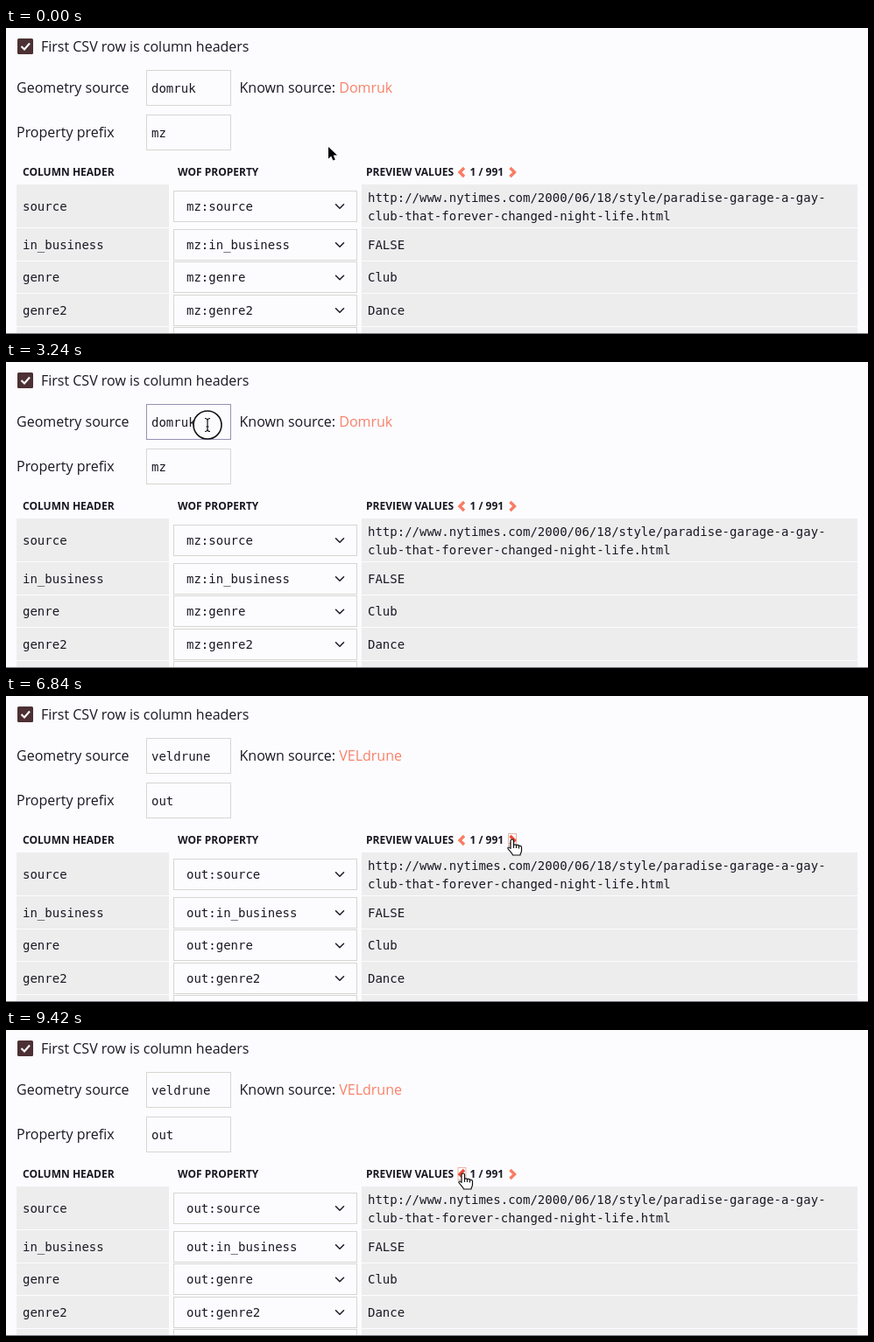
Write an HTML page that moves like this. It is 984 px wide and 350 px high and loops after 9480 ms.

```html
<!DOCTYPE html>
<html lang="en">
<head>
<meta charset="utf-8">
<title>CSV column mapping</title>
<style>
html, body { margin: 0; width: 100%; height: 100%; overflow: hidden; background: #fcfcff; }
svg { display: block; }
text { fill: #1a1822; font: 16px "Open Sans", sans-serif; white-space: pre; }
.mono { font: 14px "DejaVu Sans Mono", monospace; }
.head { font-weight: 700; font-size: 12px; }
.menu { font: 12px Inter, sans-serif; }
.link { fill: #fa8168; }
.cell { fill: #ededee; }
.box { fill: #fcfcff; stroke: #d6d6d2; }
.focus { fill: #fcfcff; stroke: #9393b2; }
.line { fill: none; stroke: #24202c; stroke-width: 1.6; stroke-linecap: round; stroke-linejoin: round; }
.popup { fill: #fff; filter: drop-shadow(0 4px 5px rgba(50, 50, 65, .5)); }
</style>
</head>
<body>
<svg id="stage" width="984" height="350" viewBox="0 0 984 350"></svg>
<script>
const LOOP = 9480, STEP = 60;
const OLD = 'Domruk', NEW = 'VELdrune';
const FIELDS = ['source', 'in_business', 'genre', 'genre2', 'name'];
const URL_LINES = ['http://www.nytimes.com/2000/06/18/style/paradise-garage-a-gay-',
  'club-that-forever-changed-night-life.html'];

const UNCHECK = 1200, RECHECK = 2340, FOCUS = 3180, TYPE = 3660, KEY = 180,
  ACCEPT = 5040, BLUR = 5280, NEXT = 7020, PREVIOUS = 7800;
const CLICKS = [UNCHECK, RECHECK, FOCUS, NEXT, PREVIOUS];
const CLICK_TIME = 180;

// Pointer stops: time, x, y
const STOPS = [[0, 368, 136], [60, 368, 136], [900, 23, 19], [2520, 23, 19],
  [3060, 230, 72], [5520, 230, 72], [6600, 578, 164], [7260, 578, 164],
  [7680, 522, 164], [LOOP, 522, 164]];

const text = (x, y, content, cls = '') => `<text x="${x}" y="${y}" class="${cls}">${content}</text>`;
const rect = (x, y, w, h, cls) => `<rect x="${x}" y="${y}" width="${w}" height="${h}" class="${cls}"/>`;
const path = (d, attrs) => `<path d="${d}" ${attrs}/>`;
const within = (t, from, to) => t >= from && t < to;

function pointerAt(t) {
  const i = STOPS.findIndex(stop => stop[0] > t);
  const [t0, x0, y0] = STOPS[i - 1], [t1, x1, y1] = STOPS[i];
  const u = (t - t0) / (t1 - t0), ease = u * u * (3 - 2 * u);
  return [x0 + (x1 - x0) * ease, y0 + (y1 - y0) * ease];
}

function checkbox(checked) {
  return checked
    ? '<rect x="13" y="12" width="18" height="18" rx="1.5" fill="#4c3033"/>' +
      path('M17.5 21l3.5 3.5 6-7', 'fill="none" stroke="#fcfcff" stroke-width="2.2"')
    : '<rect x="14" y="13" width="16" height="16" rx="1" fill="#fcfcff" stroke="#8b8587" stroke-width="2"/>';
}

function form(t) {
  const focused = within(t, FOCUS, BLUR), typing = within(t, TYPE, ACCEPT);
  const name = NEW.toLowerCase();
  const value = t < TYPE ? OLD.toLowerCase() : name.slice(0, Math.floor((t - TYPE) / KEY) + 1);
  let out = text(40, 27, 'First CSV row is column headers') +
    text(12, 73.5, 'Geometry source') + text(12, 124.5, 'Property prefix') +
    text(266.5, 73.5, `Known source: <tspan class="link">${t < BLUR ? OLD : NEW}</tspan>`) +
    rect(160.5, 48.5, 96, 40, focused ? 'focus' : 'box') + rect(160.5, 99.5, 96, 40, 'box') +
    text(166, 73.5, value, 'mono') + text(166, 124.5, t < BLUR ? 'mz' : 'out', 'mono');
  if (focused && t >= TYPE) out += rect(166 + value.length * 8.43, 61, 1, 16, '');
  if (typing) out += rect(160, 90, 100, 19, 'popup') + text(165, 103.5, name, 'menu');
  return out;
}

function pager(x, count, [pointerX, pointerY]) {
  const arrow = (cx, dir) => {
    const hover = Math.abs(pointerX - cx) < 6 && Math.abs(pointerY - 165) < 8;
    const outline = `<rect x="${cx - 4.5}" y="157.5" width="9" height="14" fill="none" stroke="#e9b3a6"/>`;
    return (hover ? outline : '') +
      path(`M${cx - 2.5 * dir} 160l${5 * dir} 5 ${-5 * dir} 5`,
        `fill="none" stroke="${hover ? '#ec4a35' : '#fa7c62'}" stroke-width="3.4"`);
  };
  return text(x, 169, 'PREVIEW VALUES', 'head') + arrow(x + 109.5, -1) +
    text(x + 118.5, 169, count, 'head') + arrow(x + 167, 1);
}

function table(t, pointer) {
  const headers = !within(t, UNCHECK, RECHECK), second = within(t, NEXT, PREVIOUS);
  const selectX = headers ? 191.5 : 14.5;
  const previewX = selectX + (headers ? 214.5 : 215), previewW = headers ? 566 : 177;
  const prefix = t < BLUR ? 'mz' : 'out';
  const values = headers ? [URL_LINES[0].slice(0, 40), 'FALSE', 'Club', 'Dance', ''] : FIELDS;
  let out = headers ? text(19, 169, 'COLUMN HEADER', 'head') : '';
  out += text(selectX + 4.5, 169, 'WOF PROPERTY', 'head') +
    pager(headers ? 411 : 234, headers ? `${second ? 2 : 1} / 991` : '1 / 992', pointer);

  let top = 178.5;
  FIELDS.forEach((field, i) => {
    const tall = headers && !second && i === 0;
    const height = tall ? 50.5 : 37.5, middle = top + height / 2, base = middle + 4.8;
    const y = Math.round(top), h = Math.round(top + height) - 1 - y;
    if (headers) out += rect(12, y, 174, h, 'cell') + text(19, base, field, 'mono');
    out += rect(previewX, y, previewW, h, 'cell') +
      rect(selectX, Math.floor(middle - 17.5) + .5, 209, 35, 'box') +
      text(selectX + 14.5, base, `${field === 'name' ? 'wof' : prefix}:${field}`, 'mono') +
      path(`M${selectX + 185} ${middle - 2}l4.5 4.5 4.5-4.5`, 'class="line"');
    const lines = tall ? URL_LINES : [values[i]], firstBase = tall ? 198.5 : base;
    lines.forEach((line, n) => out += text(previewX + 7, firstBase + n * 21, line, 'mono'));
    top += height;
  });
  return out;
}

function cursor(t, [x, y]) {
  if (within(t, TYPE, 5520)) return '';
  const overCheckbox = x < 34 && y < 34;
  const overArrow = y > 156 && (Math.abs(x - 578) < 6 || Math.abs(x - 522) < 6);
  const overInput = x > 160 && x < 257 && y > 48 && y < 89;
  let shape;
  if (overCheckbox || overArrow) {
    shape = path('M-2 1.5C-2-.5 1.5-.5 1.5 1.5V7C1.5 5.5 4.5 5.5 4.5 7 4.5 6 7.5 6 7.5 7.7 7.5 7 10.5 7 10.5 9V13C10.5 15 9 16 9 18H.5C0 16-4 12.5-5 10.5-5.5 8.5-3.5 8.5-2 10.5ZM1.5 7v3M4.5 7v3M7.5 8v2.5',
      'fill="#fff" stroke="#111" stroke-width="1.2" stroke-linejoin="round"');
  } else if (overInput) {
    shape = path('M-3-7.5Q0-7.5 0-5 0-7.5 3-7.5M0-5V5M-3 7.5Q0 7.5 0 5 0 7.5 3 7.5M-1.5 2h3',
      'fill="none" stroke="#111" stroke-width="1.2"');
  } else {
    shape = path('M0 0v13.5l3.2-3 2.2 5 2.4-1-2.2-5h4.4z', 'fill="#000" stroke="#fff" paint-order="stroke"');
  }
  const pressed = CLICKS.some(click => within(t, click, click + CLICK_TIME));
  const ring = pressed ? '<circle r="16" fill="#fcfcff" fill-opacity=".85" stroke="#111" stroke-width="1.6"/>' : '';
  return `<g transform="translate(${x} ${y})">${ring}${shape}</g>`;
}

const stage = document.getElementById('stage');
let shown = -1;

function draw() {
  const t = Math.floor(performance.now() % LOOP / STEP) * STEP;
  if (t !== shown) {
    shown = t;
    const pointer = pointerAt(t);
    stage.innerHTML = table(t, pointer) + checkbox(!within(t, UNCHECK, RECHECK)) + form(t) +
      '<rect y="349" width="984" height="1" fill="#77757c"/>' + cursor(t, pointer);
  }
  requestAnimationFrame(draw);
}
draw();
</script>
</body>
</html>
```
